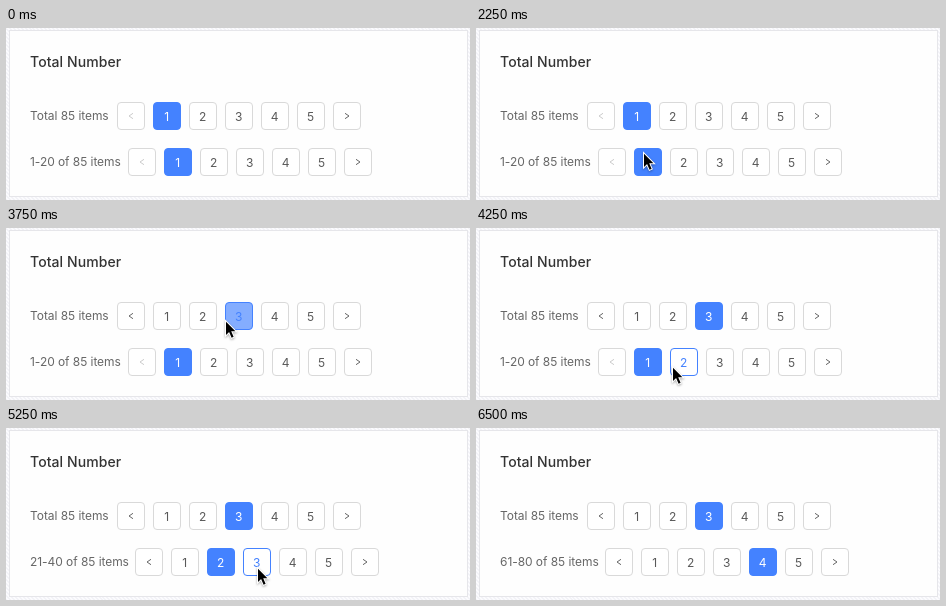
An HTML page for the animation above (7250 ms loop, 464 px wide and 172 px high).

```html
<!DOCTYPE html>
<html lang="en">
<head>
<meta charset="utf-8">
<title>Pagination totals</title>
<style>
  html, body { margin: 0; width: 100%; height: 100%; overflow: hidden; }
  body { background: repeating-linear-gradient(45deg, #f3f3f8 0 1.4px, #fcfcfe 1.4px 2.8px); }
  svg { display: block; width: 464px; height: 172px; font: 12px Inter, sans-serif; }
  .title { font-size: 14px; font-weight: 500; fill: #333; letter-spacing: .08px; }
  .label { fill: #666; letter-spacing: -.06px; }
  .digit { text-anchor: middle; }
  .cursor { stroke: #fff; stroke-width: 2; paint-order: stroke; filter: drop-shadow(0 1px 1px #0005); }
</style>
</head>
<body>
<svg id="stage" viewBox="0 0 464 172"></svg>
<script>
const LOOP = 7250, STEP = 250, FADE = 300;
const BLUE = '#4482ff', GRAY = '#d9d9d9', TEXT = '#595959';
const stage = document.getElementById('stage');

// Pointer trips through points [ms, x, y]; it is off screen between trips.
const trips = [
  [[250, -5, 2], [500, -5, 17], [1000, -5, 17]],
  [[1500, 2, 27], [1750, 8, 1]],
  [[2250, 167, 124], [2500, 184, 82], [2750, 187, 76], [3250, 207, 105],
   [3750, 219, 92], [4000, 245, 132], [4250, 196, 138], [4500, 199, 140],
   [5000, 253, 138], [5500, 249, 139], [6000, 287, 140], [6250, 287, 140]]
];

// One press of a page button: the pointer enters, clicks and leaves.
const press = (page, enter, click, leave) => ({ page, enter, click, leave });
const firstPage = press(1, -LOOP, -LOOP, -LOOP);
const upper = [firstPage, press(2, 3000, 3060, 3500), press(3, 3500, 3660, 4000)];
const lower = [firstPage, press(2, 4250, 4310, 4750), press(3, 4750, 5310, 6000),
  press(4, 6000, 6060, 6500)];

const easeOut = u => 1 - (1 - Math.min(u, 1)) ** 3;

function pointerAt(t) {
  const trip = trips.find(points => t >= points[0][0] && t <= points.at(-1)[0]);
  if (!trip) return null;
  const next = Math.max(1, trip.findIndex(point => point[0] >= t));
  const [t0, x0, y0] = trip[next - 1], [t1, x1, y1] = trip[next];
  const u = (t - t0) / (t1 - t0);
  return [x0 + (x1 - x0) * u, y0 + (y1 - y0) * u].map(Math.round);
}

const activeAt = (presses, t) => presses.findLast(p => p.click <= t);

const box = (x, y, fill, stroke) =>
  `<rect x="${x + .5}" y="${y + .5}" width="27" height="27" rx="3.5" fill="${fill}" stroke="${stroke}"/>`;

function arrow(x, y, dir, color) {
  const cx = x + 14, cy = y + 14;
  return box(x, y, '#fff', GRAY) +
    `<path d="M${cx - 2 * dir} ${cy - 2.7}l${4 * dir} 2.7l${-4 * dir} 2.7" fill="none" stroke="${color}"/>`;
}

function pager(x, y, presses, t) {
  const active = activeAt(presses, t);
  const hovered = presses.find(p => p.enter <= t && t < p.click);
  const shade = 100 * easeOut((t - active.click) / FADE);
  const fill = `color-mix(in srgb, ${BLUE} ${shade}%, white)`;
  const ink = t < active.leave ? BLUE : '#fff';
  let out = arrow(x, y, -1, active.page === 1 ? '#ccc' : '#666');
  for (let page = 1; page <= 5; page++) {
    const left = x + 36 * page, on = page === active.page, hot = page === hovered?.page;
    out += box(left, y, on ? fill : '#fff', on || hot ? BLUE : GRAY) +
      `<text class="digit" x="${left + 13.6}" y="${y + 18.7}" fill="${on ? ink : hot ? BLUE : TEXT}">${page}</text>`;
  }
  return out + arrow(x + 216, y, 1, '#666');
}

const label = (y, text) => `<text class="label" x="24" y="${y}">${text}</text>`;

const cursor = ([x, y]) =>
  `<path class="cursor" transform="translate(${x} ${y})" d="M1 1.8V15l3.1-2.9 2.5 5.6 2-.9-2.4-5.5h4.2z"/>`;

function draw(t) {
  const { page } = activeAt(lower, t), tip = pointerAt(t);
  stage.innerHTML =
    '<rect x="3.5" y="2.5" width="458" height="166" fill="#fefefe" stroke="#e6e6ea"/>' +
    '<text class="title" x="24" y="39">Total Number</text>' +
    label(92, 'Total 85 items') + pager(111, 74, upper, t) +
    label(138, `${page * 20 - 19}-${page * 20} of 85 items`) +
    pager(page === 1 ? 122 : 129, 120, lower, t) +
    (tip ? cursor(tip) : '');
}

// The picture advances in hard steps of a quarter second.
let shown = -1;
function tick() {
  const step = Math.floor(performance.now() % LOOP / STEP);
  if (step !== shown) draw((shown = step) * STEP);
  requestAnimationFrame(tick);
}
tick();
</script>
</body>
</html>
```
